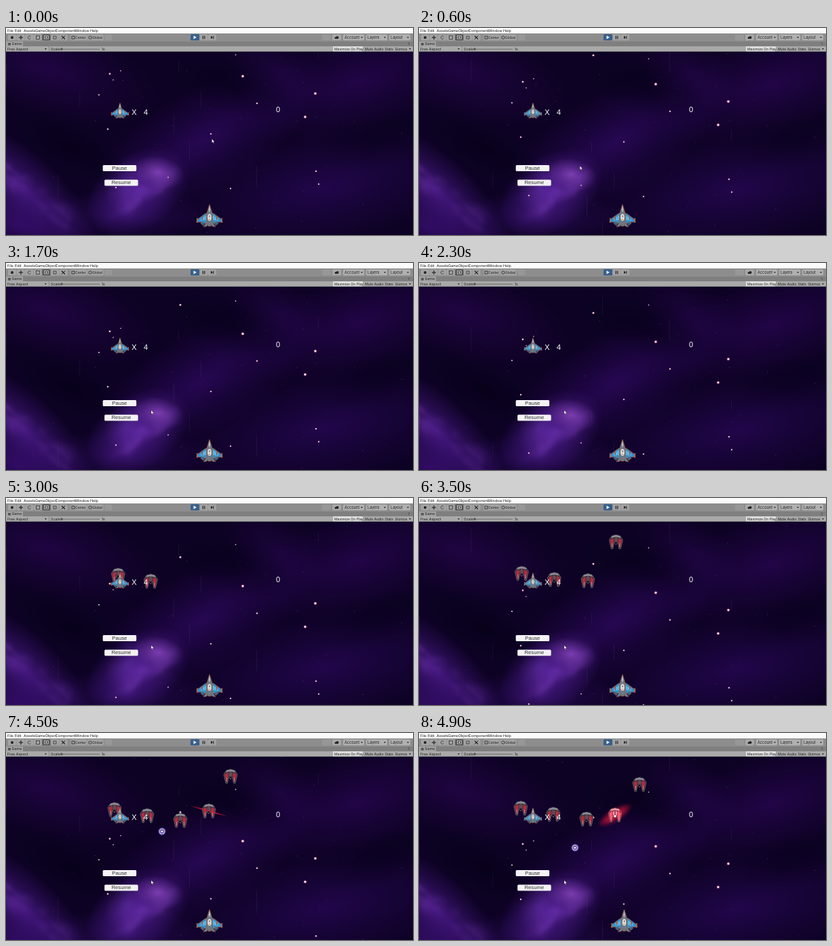
These frames come from a looping animation (600 px wide and 305 px high, 5000 ms). An HTML page with a canvas:

```html
<!DOCTYPE html>
<html>
<head>
<meta charset="utf-8">
<style>
html, body { margin: 0; width: 100%; height: 100%; overflow: hidden; background: #0b0220; }
canvas { display: block; }
</style>
</head>
<body>
<canvas id="stage" width="600" height="305"></canvas>
<script>
const LOOP = 5000, STEP = 100, W = 600, H = 305, TOP = 35;
const stage = document.getElementById('stage').getContext('2d');
let g = stage;

function seeded(seed) {
  return () => (seed = (seed * 16807) % 2147483647) / 2147483647;
}
function rect(x, y, w, h, fill) {
  g.fillStyle = fill;
  g.fillRect(x, y, w, h);
}
function box(x, y, w, h, fill, r = 1.5) {
  g.fillStyle = fill;
  g.beginPath();
  g.roundRect(x, y, w, h, r);
  g.fill();
}
function disc(x, y, r, fill) {
  g.fillStyle = fill;
  g.beginPath();
  g.arc(x, y, r, 0, 7);
  g.fill();
}
function poly(pts, fill, stroke, width = 0.7) {
  g.beginPath();
  for (let i = 0; i < pts.length; i += 2) g.lineTo(pts[i], pts[i + 1]);
  g.closePath();
  if (fill) { g.fillStyle = fill; g.fill(); }
  if (stroke) { g.strokeStyle = stroke; g.lineWidth = width; g.stroke(); }
}
// Draws a polygon and its left-right reflection.
function pair(pts, fill, stroke, width) {
  poly(pts, fill, stroke, width);
  poly(pts.map((v, i) => i % 2 ? v : -v), fill, stroke, width);
}
function text(s, x, y, size, fill, align = 'left', font = 'Inter, Roboto, sans-serif') {
  g.font = size + 'px ' + font;
  g.fillStyle = fill;
  g.textAlign = align;
  g.textBaseline = 'middle';
  g.fillText(s, x, y);
}
function at(x, y, scale, draw) {
  g.save();
  g.translate(x, y);
  g.scale(scale, scale);
  draw();
  g.restore();
}
function layer(w, h, draw) {
  const c = document.createElement('canvas');
  c.width = w;
  c.height = h;
  g = c.getContext('2d');
  draw();
  g = stage;
  return c;
}
function cloud(x, y, rx, ry, angle, rgb, alpha) {
  g.save();
  g.translate(x, y);
  g.rotate(angle);
  g.scale(rx, ry);
  const grad = g.createRadialGradient(0, 0, 0, 0, 0, 1);
  grad.addColorStop(0, `rgba(${rgb},${alpha})`);
  grad.addColorStop(0.5, `rgba(${rgb},${alpha * 0.45})`);
  grad.addColorStop(1, `rgba(${rgb},0)`);
  g.fillStyle = grad;
  g.fillRect(-1, -1, 2, 2);
  g.restore();
}

const nebula = layer(W, 360, () => {
  rect(0, 0, W, 360, '#0d0224');
  g.translate(0, 30);
  cloud(60, 60, 170, 70, 0.3, '50,8,95', 0.5);
  cloud(290, 165, 190, 75, -0.5, '60,12,120', 0.55);
  cloud(520, 80, 190, 75, -0.3, '55,8,105', 0.5);
  cloud(470, 235, 230, 85, -0.2, '50,10,105', 0.55);
  cloud(400, 60, 90, 45, 0.5, '45,8,90', 0.4);
  cloud(25, 240, 140, 55, 0.75, '85,30,155', 0.75);
  cloud(15, 290, 130, 60, 0.3, '60,15,120', 0.7);
  cloud(195, 240, 85, 55, -0.6, '100,40,175', 0.8);
  cloud(180, 275, 120, 40, 0, '60,18,120', 0.55);
  cloud(225, 213, 38, 24, 0.2, '160,85,215', 0.65);
  cloud(178, 232, 30, 42, 0.4, '110,55,185', 0.4);
  cloud(95, 175, 100, 38, 0.5, '5,0,22', 0.7);
  cloud(330, 85, 100, 40, 0.3, '6,0,24', 0.6);
  cloud(545, 165, 100, 40, -0.2, '6,0,24', 0.5);
  const rnd = seeded(41);
  for (let i = 0; i < 60; i++) {
    const left = i % 2, u = rnd();
    const x = left ? u * 110 - 10 : 165 + u * 80;
    const y = left ? 190 + u * 85 + rnd() * 30 : 262 - u * 55 + rnd() * 22;
    cloud(x, y, 8 + rnd() * 20, 5 + rnd() * 10, left ? 0.7 : -0.6, '130,65,195', 0.1);
  }
});

const toolbar = layer(W, TOP, () => {
  const ink = '#222';
  rect(0, 0, W, TOP, '#a2a2a2');
  rect(0, 0, W, 8, '#fbfbfb');
  [['File', 2], ['Edit', 13], ['Assets', 26], ['GameObject', 43],
   ['Component', 73], ['Window', 102], ['Help', 124]]
    .forEach(([s, x]) => text(s, x, 4, 5.4, ink));

  rect(0, 8, W, 12, '#8d8d8d');
  for (let i = 0; i < 7; i++) {
    box(3 + i * 12.6, 9.5, 12, 8.8, i === 4 ? '#555' : '#a3a3a3');
  }
  g.strokeStyle = ink;
  g.lineWidth = 0.8;
  disc(9, 14, 2, ink);
  poly([19, 14, 25, 14, 22, 14, 22, 11, 22, 17, 22, 14], null, ink);
  g.beginPath();
  g.arc(34.5, 14, 2.3, 0.5, 5.8);
  g.stroke();
  g.strokeRect(44.5, 11.5, 5, 5);
  g.strokeStyle = '#ddd';
  g.strokeRect(56.5, 11.5, 6, 4.5);
  disc(59.5, 13.8, 1, '#ddd');
  g.strokeStyle = ink;
  g.strokeRect(70, 12, 4, 4);
  poly([82, 11.5, 87, 16.5], null, ink, 1.2);
  poly([87, 11.5, 82, 16.5], null, ink, 0.8);
  box(95, 9.5, 24, 8.8, '#a3a3a3');
  box(119.6, 9.5, 24, 8.8, '#a3a3a3');
  g.strokeStyle = ink;
  g.strokeRect(97, 12, 4, 4);
  text('Center', 102, 14.2, 5, ink);
  g.beginPath();
  g.arc(124, 14, 2.2, 0, 7);
  g.stroke();
  text('Global', 127, 14.2, 5, ink);
  box(145.5, 9.5, 11, 8.8, '#979797');
  box(272, 9.3, 13, 9, '#365f8c');
  box(285.5, 9.3, 12, 9, '#a3a3a3');
  box(298, 9.3, 12, 9, '#a3a3a3');
  poly([276.5, 11.2, 281, 13.8, 276.5, 16.4], '#f2f2f2');
  rect(289.7, 11.5, 1.2, 4.8, ink);
  rect(292.2, 11.5, 1.2, 4.8, ink);
  poly([302, 11.5, 305, 13.8, 302, 16.2], ink);
  rect(305.3, 11.5, 1, 4.8, ink);
  box(466, 9.5, 13, 8.8, '#979797');
  box(481, 9.5, 13, 8.8, '#a8a8a8');
  disc(486.2, 14.5, 1.6, ink);
  disc(488.5, 14, 2, ink);
  [['Account', 497], ['Layers', 531], ['Layout', 565]].forEach(([s, x]) => {
    box(x, 9.5, 31, 8.8, '#b0b0b0');
    text(s, x + 2, 14.2, 5.6, ink);
    poly([x + 26, 13, x + 29, 13, x + 27.5, 15], ink);
  });

  rect(0, 20, W, 7, '#7f7f7f');
  rect(0, 20, 25, 7, '#a2a2a2');
  rect(3, 22, 4, 3.5, '#555');
  text('Game', 8.5, 23.8, 5.4, ink);
  rect(593.5, 21.5, 1, 1, ink);
  rect(593.5, 23.5, 1, 1, ink);
  rect(0, 27, W, 8, '#a9a9a9');
  text('Free Aspect', 2, 31.2, 5.4, ink);
  poly([57, 30, 60, 30, 58.5, 32], ink);
  rect(63, 27, 0.6, 8, '#777');
  text('Scale', 66, 31.2, 5.4, ink);
  rect(81, 30.7, 57, 0.9, '#666');
  disc(82, 31.1, 1.8, '#555');
  text('1x', 141, 31.2, 5.2, ink);
  rect(482, 27, 44, 8, '#dedede');
  [['Maximize On Play', 484], ['Mute Audio', 529], ['Stats', 558.5], ['Gizmos', 573.5]]
    .forEach(([s, x]) => text(s, x, 31.2, 5.1, ink));
  poly([594, 30, 597, 30, 595.5, 32], ink);
  rect(0, 34.5, W, 0.5, '#555');
});

// x, y at the start, radius
const stars = [
  [349, 71, 1.7], [456, 96.5, 1.7], [441, 131, 1.7], [153, 67.5, 1.2],
  [257, 28.5, 1.3], [150, 149, 1.1], [370, 111, 1.1], [302, 156, 1],
  [457, 211, 1.1], [461, 230, 1], [137, 98.5, 0.9], [162, 235, 1],
  [331, 236.5, 1], [239, 220, 0.8], [169, 63, 0.7], [158, 76.5, 0.7]
];
const rndDust = seeded(77);
const dust = Array.from({ length: 95 }, () =>
  [rndDust() * W, rndDust() * 320 - 15, 0.08 + 0.3 * rndDust() ** 2]);
const rndRain = seeded(9);
const rain = Array.from({ length: 9 }, () =>
  [rndRain() * W, rndRain() * 270, 14 + rndRain() * 22]);

function drawSky(t) {
  g.drawImage(nebula, 0, -30 + 4.9 * t);
  rain.forEach(([x, y, len]) =>
    rect(x, TOP + (y + t * 200) % 290 - len, 0.6, len, 'rgba(150,140,185,.16)'));
  dust.forEach(([x, y, a]) =>
    rect(x, y + 9.7 * t, 1, 1, `rgba(205,160,225,${a})`));
  disc(338.5, 39.5 + 9.7 * t, 0.9, '#c9b2d8');
  stars.forEach(([x, y, r]) => {
    y += 19.6 * t;
    disc(x, y, r * 1.5, 'rgba(220,80,140,.3)');
    disc(x, y, r, '#f0bcc6');
    disc(x, y, r * 0.6, '#fff');
  });
}

function ship() {
  const edge = '#a8532f';
  pair([9, 14, 13, 11, 11, 7, 5, 7], '#276b9c', edge);
  pair([3, -5, 7, -3, 18, 5, 19, 9, 10, 9, 4, 12], '#3190cb', edge);
  pair([5, -1, 13, 4, 13, 7, 5, 6], '#54b7e6');
  pair([10, 0, 11.5, 0, 11.5, 6, 10, 6], '#b84a36');
  pair([17.5, 3, 19, 3, 19, 10, 17.5, 10], '#c06044');
  pair([3, 8, 9, 16, 4, 15, 2, 11], '#4a8fb5', edge);
  poly([0, -17, 2.5, -9, 4.5, -2, 4.5, 9, 2, 15, -2, 15, -4.5, 9, -4.5, -2, -2.5, -9],
    '#6b7885', edge);
  poly([0, -16, 1.3, -9, 0, -5, -1.3, -9], '#b4bcc2');
  g.fillStyle = '#e9e3dc';
  g.beginPath();
  g.ellipse(0, 2, 2.7, 5, 0, 0, 7);
  g.fill();
  rect(-0.6, -1, 1.4, 3, '#7a6b70');
  rect(-1, 4, 1.5, 1.5, '#b06c5d');
}

function enemy(hit) {
  const edge = '#77767e';
  pair([0, -10.5, 6, -9, 10, -3, 7, 10, 4.5, 10, 3, 1, 0, 4], hit ? '#a22440' : '#3a303a', edge);
  pair([4, -6, 8.5, -3, 6.5, 8, 5, 7, 3.5, -1], hit ? '#ff5876' : '#b02c42');
  pair([0, -10, 5.5, -8.7, 7.5, -6, 0, -7.5], hit ? '#f39bab' : '#929098');
  pair([1, -6, 3, -5, 2.5, 0, 1, 1], hit ? '#ffb2bf' : '#6d4250');
  disc(0, 1.5, 1.6, hit ? '#fff' : '#15101c');
  pair([5, 2, 6, 2, 5.8, 8, 5, 8], '#d98490');
}

// Start time, start x, start y, place in the formation
const squad = [
  [2.33, 190, 15, 160, 113], [2.4, 235, 15, 208, 122], [3.05, 270, 15, 257, 129],
  [3.35, 299, 15, 299, 115], [4.25, 320, 25.3, 335, 78]
];
function drawSquad(t) {
  const sway = 7.7 * (Math.cos(2 * Math.PI * (t - 4.25) / 1.25) - 0.309);
  squad.forEach(([start, x0, y0, x1, y1], i) => {
    if (t < start) return;
    const left = (1 - Math.min(1, (t - start) / 0.7)) ** 3;
    const struck = i === 3 && t >= 4.4;
    const x = x1 + (x0 - x1) * left + sway;
    const y = y1 + (y0 - y1) * left + 0.2 * sway + (i === 3 ? 20 * Math.max(0, t - 4.5) : 0);
    if (struck) drawSlash(x, y, t - 4.5);
    at(x, y, 1, () => enemy(struck && t > 4.7));
    if (struck && t < 4.7) drawSlash(x, y, t - 4.5, 0.45);
  });
}
function drawSlash(x, y, age, alpha = 0.8) {
  const wide = 1 + 17 * Math.max(0, age);
  g.save();
  g.globalAlpha = alpha;
  cloud(x, y, 30, wide * 1.5, 0.28 - 2.1 * age, '235,20,55', 1);
  cloud(x, y, 28, wide, 0.28 - 2.1 * age, '240,25,60', 0.8);
  g.restore();
}

function drawShot(t) {
  if (t < 4.2) return;
  at(230, 145 + 60 * (t - 4.5), 1, () => {
    disc(0, 0, 5.8, 'rgba(105,75,200,.55)');
    disc(0, 0, 4.5, '#b9aee4');
    disc(0, 0, 2.9, '#57498f');
    disc(0, 0, 1.6, '#eeeaff');
  });
}

function button(label, x, y) {
  box(x, y, 49.5, 9, '#f4f2f5', 1.5);
  text(label, x + 24.7, y + 4.8, 7.8, '#333', 'center', 'bold-face, "Liberation Sans", sans-serif');
}

function drawHud() {
  at(168, 122, 0.69, ship);
  const face = '"Liberation Sans", sans-serif';
  text('X', 189, 124.5, 11, '#fff', 'center', face);
  text('4', 206, 124.5, 11, '#fff', 'center', face);
  text('0', 401, 120.5, 11, '#fff', 'center', face);
  g.lineWidth = 0.3;
  button('Pause', 142.7, 202);
  button('Resume', 145.2, 223.5);
}

function drawCursor(t) {
  const u = Math.min(1, t / 0.9), p = u * u * (3 - 2 * u);
  at(303.5 - 89.5 * p, 163.5 + 53.5 * p, 1, () =>
    poly([0, 0, 0, 5.6, 1.3, 4.5, 2.2, 6.4, 3, 6, 2.2, 4.2, 3.9, 4.1], '#fff', '#222', 0.4));
}

function frame(now) {
  const t = Math.floor(now % LOOP / STEP) * STEP / 1000;
  g.clearRect(0, 0, W, H);
  g.save();
  g.beginPath();
  g.rect(0, TOP, W, H - TOP);
  g.clip();
  drawSky(t);
  drawSquad(t);
  drawShot(t);
  at(300 + 25 * Math.max(0, t - 4.8), 277, 1, ship);
  drawHud();
  drawCursor(t);
  g.restore();
  g.drawImage(toolbar, 0, 0);
}

const begin = performance.now();
function tick() {
  frame(performance.now() - begin);
  requestAnimationFrame(tick);
}
tick();
</script>
</body>
</html>
```
